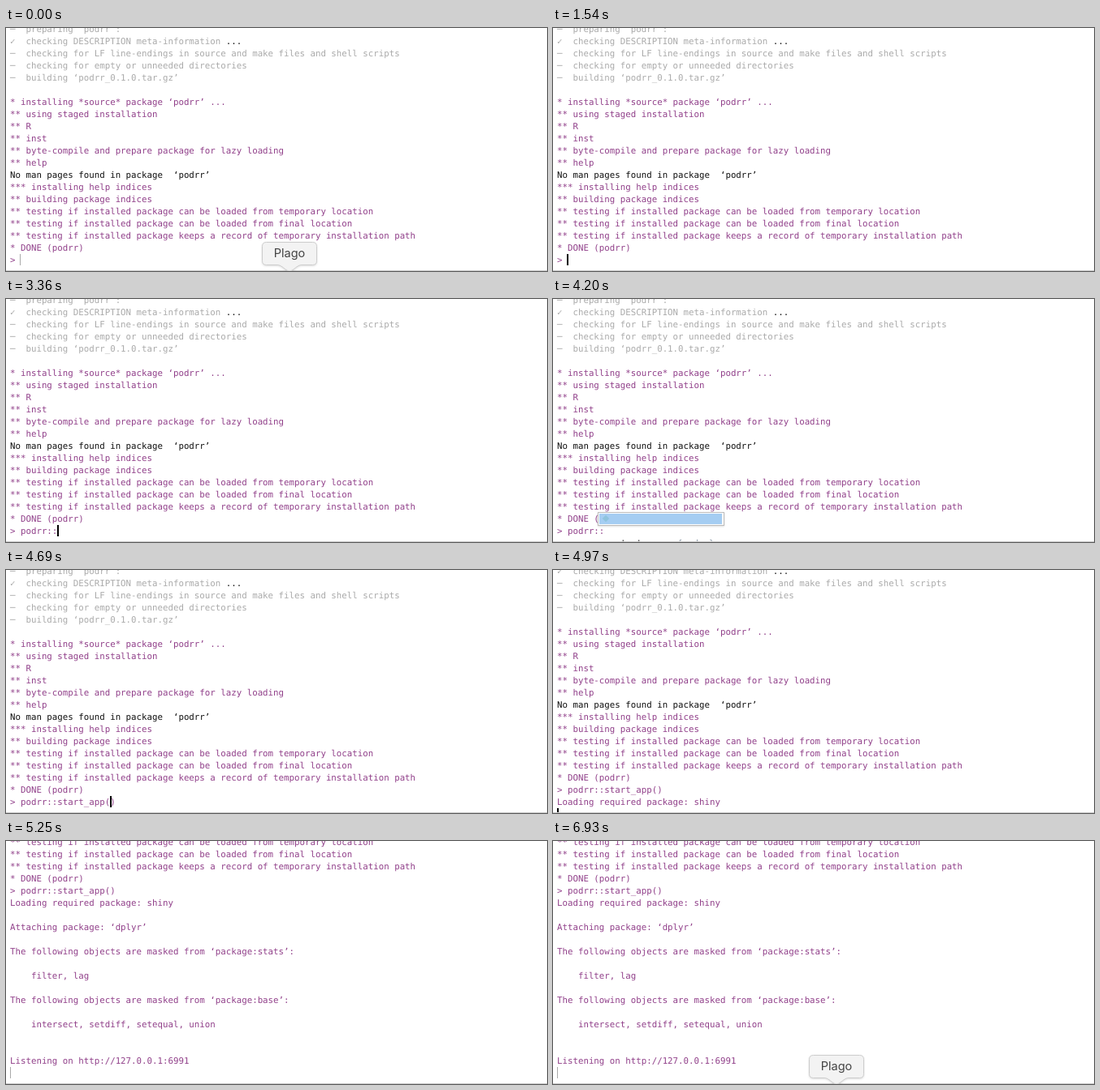
These frames come from a looping animation (666x300 px, 7.28 s). An HTML page:

```html
<!DOCTYPE html>
<html lang="en">
<head>
<meta charset="utf-8">
<title>Console session</title>
<style>
  html, body { margin: 0; width: 100%; height: 100%; overflow: hidden; background: #fff; }
  #stage { position: relative; width: 666px; height: 300px; overflow: hidden; background: #fff; }
  #stage > * { position: absolute; }
  #log, #popup {
    font: 10.77px/15px "DejaVu Sans Mono", monospace;
    text-rendering: geometricPrecision;
    white-space: pre;
    font-variant-ligatures: none;
  }
  #log { left: 5px; top: -6px; color: #91408a; }
  #log div { height: 15px; }
  .dim { color: #aaa; }
  .out, .dim b { color: #111; font-weight: normal; }
  #caret { height: 14px; }
  #popup {
    left: 55px; top: 263px; width: 154px; height: 15px;
    border: 1px solid #bcbcbc; background: #fff; color: #111;
    box-shadow: 0 1px 2px #0002;
  }
  #popup * { position: absolute; }
  #pick { left: 1px; top: 1px; width: 151px; height: 13px; background: #a5cdf2; }
  #icon { left: 6px; top: 4px; width: 6px; height: 6px; background: #8fc3dd; transform: rotate(45deg); }
  #name { left: 21px; }
  #pkg { left: 97px; color: #8f9ca8; }
  #edge { left: 0; top: 299px; width: 666px; height: 1px; background: #cfcfcf; }
  #tips { left: 0; top: 0; }
  #tips path { fill: #f3f3f3; stroke: #cdcdcd; filter: drop-shadow(0 1px 1px #0002); }
  #tips text { font: 14.5px Inter, sans-serif; fill: #444; text-anchor: middle; }
</style>
</head>
<body>
<div id="stage">
  <div id="log"></div>
  <div id="caret"></div>
  <div id="popup">
    <div id="pick"></div><div id="icon"></div>
    <span id="name">start_app</span><span id="pkg">{podrr}</span>
  </div>
  <div id="edge"></div>
  <svg id="tips" width="666" height="300"></svg>
</div>
<script>
const LOOP = 7280, ROW = 15, CHAR = 6.484, PROMPT = 19;
const $ = id => document.getElementById(id);

const build = [
  "~─  preparing ‘podrr’:",
  "~✓  checking DESCRIPTION meta-information <b>...</b>",
  "~─  checking for LF line-endings in source and make files and shell scripts",
  "~─  checking for empty or unneeded directories",
  "~─  building ‘podrr_0.1.0.tar.gz’",
  "",
  "* installing *source* package ‘podrr’ ...",
  "** using staged installation",
  "** R",
  "** inst",
  "** byte-compile and prepare package for lazy loading",
  "** help",
  "!No man pages found in package  ‘podrr’",
  "*** installing help indices",
  "** building package indices",
  "** testing if installed package can be loaded from temporary location",
  "** testing if installed package can be loaded from final location",
  "** testing if installed package keeps a record of temporary installation path",
  "* DONE (podrr)"
];
const output = [
  "Loading required package: shiny",
  "",
  "Attaching package: ‘dplyr’",
  "",
  "The following objects are masked from ‘package:stats’:",
  "",
  "    filter, lag",
  "",
  "The following objects are masked from ‘package:base’:",
  "",
  "    intersect, setdiff, setequal, union",
  "",
  "",
  "Listening on http://127.0.0.1:6991"
];

// time, typed command, printed lines (-1 before Enter), scrolled rows
const call = "podrr::start_app()";
const steps = [
  [0, "", -1, 0],
  [2100, "p", -1, 0],
  [2240, "po", -1, 0],
  [2660, "pod", -1, 0],
  [2730, "podr", -1, 0],
  [2940, "podrr", -1, 0],
  [3290, "podrr:", -1, 0],
  [3360, "podrr::", -1, 0],
  [4620, call, -1, 0],
  [4830, call, 0, 1],
  [4970, call, 1, 1],
  [5040, call, 1, 2],
  [5180, call, 12, 13],
  [5250, call, 14, 15]
];
const caretOff = [[1050, 1540], [2030, 2100], [3850, 4340]];
const within = (t, [a, b]) => t >= a && t < b;

function addRow(text) {
  const row = document.createElement("div");
  const kind = { "~": "dim", "!": "out" }[text[0]];
  if (kind) row.className = kind;
  row.innerHTML = kind ? text.slice(1) : text;
  $("log").append(row);
  return row;
}
build.forEach(addRow);
const prompt = addRow("");
const printed = output.map(addRow);

function addTip(label, mid, width) {
  const h = width / 2 - 5.5;
  const g = document.createElementNS("http://www.w3.org/2000/svg", "g");
  g.innerHTML = `<path d="M${mid - h} 264.5h${2 * h}q5 0 5 5v18q0 5 -5 5H${mid + 15}
    c-6 0 -10 7.5 -15 7.5s-9 -7.5 -15 -7.5H${mid - h}q-5 0 -5 -5v-18q0 -5 5 -5z"/>
    <text x="${mid}" y="283">${label}</text>`;
  $("tips").append(g);
  return g;
}
const tipA = addTip("Sorvane", 281.5, 83);
const tipB = addTip("Plago", 349, 68);

function draw(t) {
  const [, typed, lines, scroll] = steps.findLast(s => s[0] <= t);
  prompt.textContent = "> " + typed;
  printed.forEach((row, i) => row.style.visibility = i < lines ? "visible" : "hidden");
  $("log").style.transform = `translateY(${-scroll * ROW}px)`;

  const entered = lines >= 0;
  const col = entered ? 0 : 2 + typed.length - (typed === call ? 1 : 0);
  const row = PROMPT + (entered ? 1 + lines : 0) - scroll;
  const idle = t < 490 || t >= 5180;
  Object.assign($("caret").style, {
    left: Math.floor(5 + col * CHAR) + "px",
    top: row * ROW - 6 + "px",
    width: idle ? "1px" : "2px",
    background: idle ? "#aaa" : "#000",
    visibility: caretOff.some(r => within(t, r)) ? "hidden" : "visible"
  });

  $("popup").style.visibility = within(t, [3500, 4620]) ? "visible" : "hidden";
  tipA.style.opacity = within(t, [6580, 6930]) ? 1 : 0;
  const fade = Math.max(0, 1 - Math.floor(t / 70) / 5);
  tipB.style.opacity = t >= 6930 ? 1 : fade;
}

const start = performance.now();
function tick(now) {
  draw(Math.max(0, now - start) % LOOP);
  requestAnimationFrame(tick);
}
draw(0);
requestAnimationFrame(tick);
</script>
</body>
</html>
```
